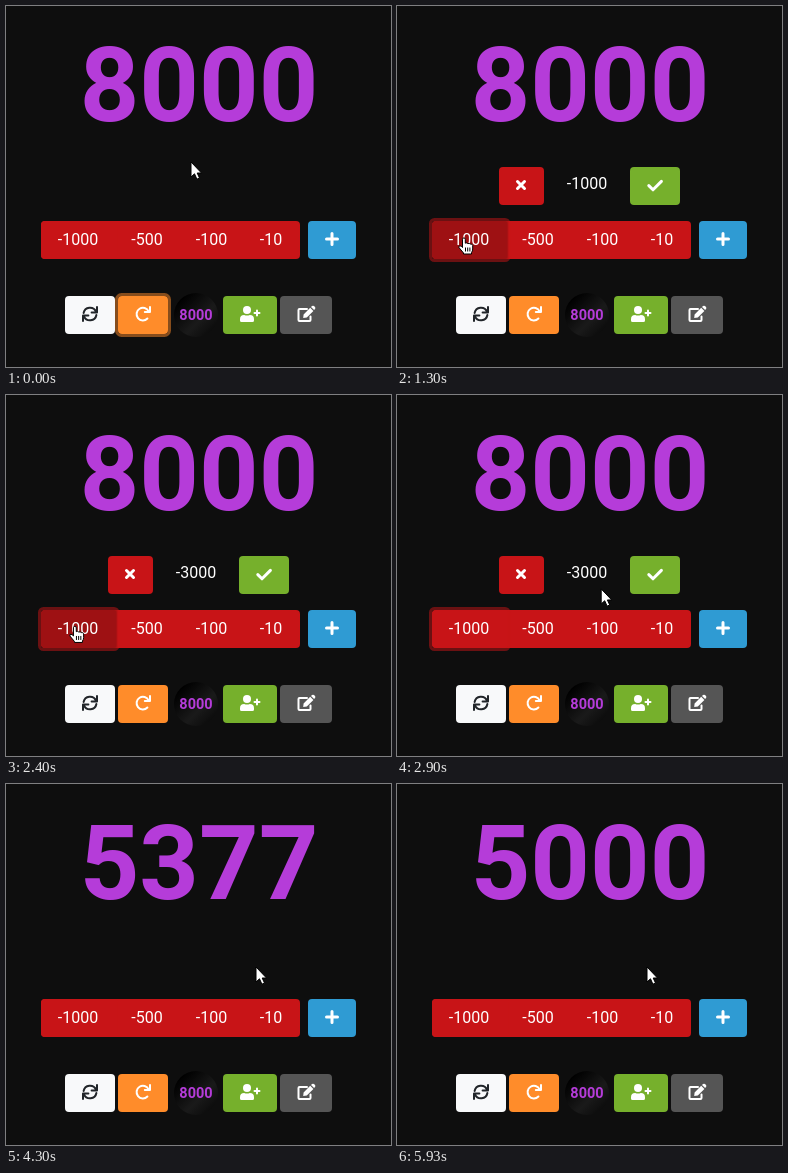
An HTML page for the animation above (5.96 s loop, 385x361 px).

```html
<!DOCTYPE html>
<html lang="en">
<head>
<meta charset="utf-8">
<title>Life counter</title>
<style>
  html, body { margin: 0; height: 100%; overflow: hidden; background: #0e0e0e; }
  svg { display: block; width: 385px; height: 361px; }
  text { font: 16px Roboto, sans-serif; fill: #fff; text-anchor: middle; }
  .life { fill: #b53cd9; font-weight: 700; }
  .line { fill: none; stroke: #fff; stroke-width: 2; stroke-linecap: round; stroke-linejoin: round; }
  .bold { stroke-width: 3; }
  .solid { fill: #fff; }
  .cursor { fill: #fff; stroke: #000; stroke-width: 1; stroke-linejoin: round; }
  .ring { fill: none; stroke-width: 3; }
</style>
</head>
<body>
<svg viewBox="0 0 385 361">
  <defs>
    <linearGradient id="disc" x1="0" y1="0" x2="1" y2="1">
      <stop offset=".15" stop-color="#000"/>
      <stop offset=".6" stop-color="#1a1a1a"/>
      <stop offset="1" stop-color="#050505"/>
    </linearGradient>
  </defs>

  <text id="total" class="life" x="193" y="115" style="font-size:104px">8000</text>

  <g id="pending">
    <rect x="102" y="161" width="45" height="38" rx="4" fill="#c81417"/>
    <path class="line bold" d="M120.5 175.5l7 7m0-7l-7 7"/>
    <text id="change" x="190" y="183"></text>
    <rect id="confirm" x="233" y="161" width="50" height="38" rx="4"/>
    <path class="line bold" d="M251.8 179.6l4.2 4.2 8.4-8.4"/>
  </g>

  <rect x="35" y="215" width="259" height="38" rx="4" fill="#c81417"/>
  <path id="thousand" d="M111.5 215H39a4 4 0 0 0-4 4v30a4 4 0 0 0 4 4h72.5z"/>
  <rect id="redRing" class="ring" x="33.5" y="213.5" width="78.5" height="41" rx="4" stroke="#c81417" stroke-opacity=".5"/>
  <text x="72" y="239">-1000</text>
  <text x="141" y="239">-500</text>
  <text x="205.5" y="239">-100</text>
  <text x="265" y="239">-10</text>
  <rect x="302" y="215" width="48" height="38" rx="4" fill="#2f9bd3"/>
  <path class="line bold" d="M320.5 233h11m-5.500-5.500v11"/>

  <rect x="59" y="290" width="50" height="38" rx="4" fill="#f8f9fa"/>
  <g class="line" style="stroke:#212529" transform="translate(84 308)">
    <path d="M-6.400-1A6.500 6.500 0 0 1 6-2.300M7-7v5.400H1.600"/>
    <path d="M-6.400-1A6.500 6.500 0 0 1 6-2.300M7-7v5.400H1.600" transform="rotate(180)"/>
  </g>

  <rect x="112" y="290" width="50" height="38" rx="4" fill="#ff8c2a"/>
  <rect id="orangeRing" class="ring" x="110.500" y="288.500" width="53" height="41" rx="5" stroke="#ff8c2a" stroke-opacity=".5"/>
  <path class="line" transform="translate(137 308)" d="M5.600-2.600A6.300 6.300 0 1 0 4.400 4.500M7-7v5H1.800"/>

  <circle cx="190" cy="309" r="22" fill="url(#disc)"/>
  <text class="life" x="190" y="314" style="font-size:14.500px">8000</text>

  <rect x="217" y="290" width="54" height="38" rx="4" fill="#76b02c"/>
  <circle class="solid" cx="241" cy="304" r="4"/>
  <path class="solid" d="M234 314.500v-1.300q0-4.200 4.200-4.200 2.800 1.200 5.600 0 4.200 0 4.200 4.200v1.300q0 1.500-1.500 1.500h-11q-1.500 0-1.500-1.500z"/>
  <path class="line" d="M248.500 307h5m-2.500-2.500v5"/>

  <rect x="274" y="290" width="52" height="38" rx="4" fill="#555"/>
  <g transform="translate(300 308)">
    <path class="line" d="M1-5H-6.500a1 1 0 0 0-1 1V6a1 1 0 0 0 1 1h10a1 1 0 0 0 1-1V2.500"/>
    <path class="solid" d="M4.200-6.200l3.200 3.200-6.600 6.600-3.600.4.400-3.600zM5-7l1-.9q1-.8 2 0l1 1q.8 1 0 2l-.9.9z"/>
  </g>

  <path id="arrow" class="cursor" d="M0 0V15L3.500 11.800 5.900 17.200 8.500 16 6.200 11H10.500z"/>
  <g id="hand" class="cursor">
    <path d="M-1.500 9.500V1.300a1.400 1.400 0 0 1 2.800 0V5.200q1.400-.8 2.600.4 1.400-.6 2.500.5 1.600-.4 2.300 1.200V11q0 2-1.200 3.600V16H-.5V15L-5 9.600q-.6-1.800 1-1.800 1.200.1 2.500 1.700z"/>
    <path d="M1.500 9.500v4m2.200-4v4m2.200-4v4" fill="none"/>
  </g>
</svg>
<script>
  const LOOP = 5960;
  const clicks = [1140, 1760, 2270];
  const CONFIRM = 3540, COUNT_START = 3548, COUNT_TIME = 979;
  const $ = id => document.getElementById(id);
  const clamp = v => Math.max(0, Math.min(1, v));
  const show = (id, on) => $(id).style.display = on ? '' : 'none';

  const easeIn = p => p ** 1.5;
  const easeOut = p => 1 - (1 - p) ** 1.5;
  const swing = p => .5 - Math.cos(Math.PI * p) / 2;

  // Pointer stops: time, x, y, easing towards the stop
  const stops = [
    [0, 185, 156], [300, 185, 156], [760, 109, 204, easeIn], [1050, 67, 232, easeOut],
    [2370, 67, 232], [2900, 204, 194, easeIn], [3250, 250, 181, easeOut],
    [3620, 250, 181], [3700, 250, 183], [LOOP, 250, 183]
  ];

  function pointer(t) {
    const i = stops.findIndex(s => s[0] > t);
    const [t0, x0, y0] = stops[i - 1], [t1, x1, y1, ease = p => p] = stops[i];
    const p = ease((t - t0) / (t1 - t0));
    return [x0 + (x1 - x0) * p, y0 + (y1 - y0) * p];
  }

  // Colour of a button hovered between two times, with a 150 ms fade
  function hover(t, from, to, base, dark) {
    const k = clamp((t - from) / 150) - clamp((t - to) / 150);
    return `rgb(${base.map((c, i) => Math.round(c + (dark[i] - c) * k))})`;
  }

  function draw(now) {
    const t = now % LOOP;
    const count = clicks.filter(c => t >= c).length;
    const open = count > 0 && t < CONFIRM;

    $('total').textContent = Math.round(8000 - 3000 * swing(clamp((t - COUNT_START) / COUNT_TIME)));
    $('change').textContent = -1000 * count;
    show('pending', open);
    show('redRing', open);
    show('orangeRing', count === 0);
    $('thousand').style.fill = hover(t, 860, 2560, [200, 20, 23], [158, 17, 19]);
    $('confirm').style.fill = hover(t, 3090, LOOP, [118, 176, 44], [96, 144, 36]);

    const onButton = t >= 700 && t < 2600 || t >= 3090 && t < 3640;
    const place = `translate(${pointer(t)})`;
    $('hand').setAttribute('transform', place);
    $('arrow').setAttribute('transform', place);
    show('hand', onButton);
    show('arrow', !onButton);
  }

  const start = performance.now();
  function tick() {
    draw(performance.now() - start);
    requestAnimationFrame(tick);
  }
  tick();
</script>
</body>
</html>
```
